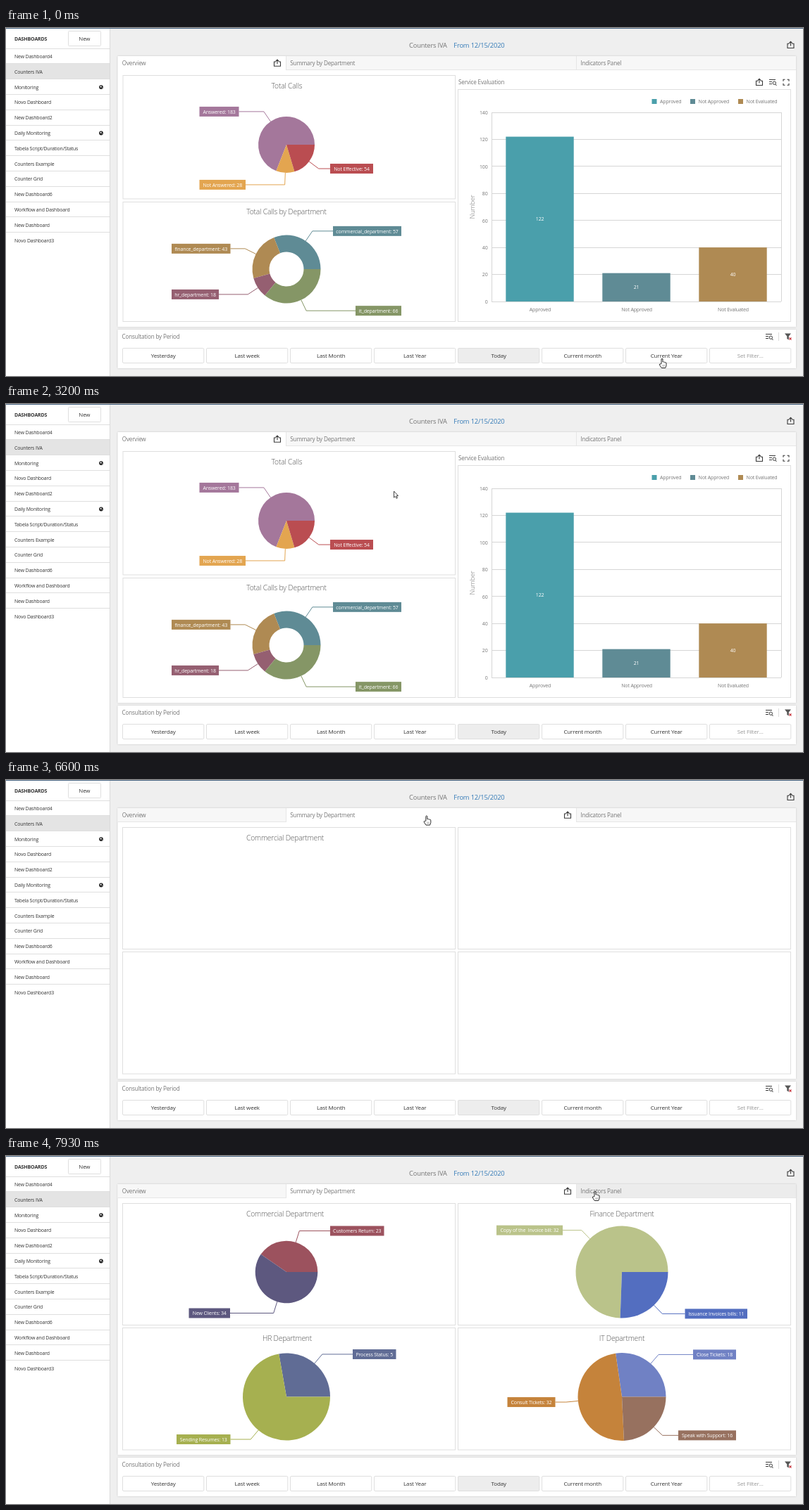
Recreate the animation shown at these times as an HTML page. Size 1131 by 495 pixels, loop 8000 ms.

```html
<!DOCTYPE html>
<html lang="en">
<head>
<meta charset="utf-8">
<title>Dashboard</title>
<style>
html, body { margin: 0; height: 100%; overflow: hidden; background: #efefef; }
svg { display: block; width: 1131px; height: 495px; }
text { font-family: "Open Sans", "Noto Sans", sans-serif; letter-spacing: -.02em; white-space: pre; }
</style>
</head>
<body>
<svg viewBox="0 0 1131 495"><g id="base"></g><g id="live"></g></svg>
<script>
const LOOP = 8000, FPS = 15;
const BORDER = '#dfdfdf', GREY = '#767676', DARK = '#3a3a3a';

const rect = (x, y, w, h, fill, more = '') =>
  `<rect x="${x}" y="${y}" width="${w}" height="${h}" fill="${fill}" ${more}/>`;
const box = (x, y, w, h, fill = '#fff', r = 0) =>
  rect(x, y, w, h, fill, `stroke="${BORDER}" rx="${r}"`);
const line = (d, color, width = 1) =>
  `<path d="${d}" fill="none" stroke="${color}" stroke-width="${width}"/>`;
// y is the middle of the capitals
const text = (s, x, y, size, fill = GREY, anchor = 'start', weight = 400) =>
  `<text x="${x}" y="${y + size * .36}" font-size="${size}" fill="${fill}" text-anchor="${anchor}" font-weight="${weight}">${s}</text>`;
const title = (s, x, y) => text(s, x, y, 10.35, '#555', 'middle', 300);
const at = (x, y, s) => `<g transform="translate(${x} ${y})">${s}</g>`;

const exportIcon = (x, y) => at(x, y,
  line('M-2-1.7H-4.5V4.5H4.5V-1.7H2M0 1.5V-4.6M-2.3-2.4L0-4.7L2.3-2.4', DARK, 1.1));
const searchIcon = (x, y) => at(x, y,
  line('M-5-3.5H4M-5-.5H-1M-5 2.5H-1M3.8 3L5.5 5', DARK) +
  `<circle cx="2.3" cy="1.2" r="2.2" fill="none" stroke="${DARK}"/>`);
const expandIcon = (x, y) => at(x, y,
  line('M-4-1.5V-4H-1.5M1.5-4H4V-1.5M4 1.5V4H1.5M-1.5 4H-4V1.5', DARK, 1.1));
const filterIcon = (x, y) => at(x, y,
  `<path d="M-5-4.5H4L.8-.5V4.5L-1.7 3V-.5Z" fill="#555"/>` + line('M1.5 1.5L4.5 4.7M4.5 1.5L1.5 4.7', '#c9373f', 1.1));
const globe = (x, y) => at(x, y,
  `<circle r="2.9" fill="#222"/><path d="M-1.8-.8L.2-1.9L.8-.4L-.4.6ZM1 .8L2 .3L1.4 1.8Z" fill="#fff"/>`);

function sidebar() {
  const names = ['New Dashboard4', 'Counters IVA', 'Monitoring', 'Novo Dashboard', 'New Dashboard2',
    'Daily Monitoring', 'Tabela Script/Duration/Status', 'Counters Example', 'Counter Grid',
    'New Dashboard6', 'Workflow and Dashboard', 'New Dashboard', 'Novo Dashboard3'];
  let s = rect(0, 0, 147, 495, '#fff') + line('M147.5 0V495', '#dadada') +
    text('DASHBOARDS', 12, 15.2, 7, '#333', 'start', 700) +
    box(88.5, 4.5, 46, 21, '#fff', 1) + text('New', 111.3, 15, 7.9, '#333', 'middle');
  names.forEach((name, i) => {
    const y = 40.5 + 21.8 * i, top = Math.round(y - 11) - .5;
    if (i == 1) s += rect(0, top, 147, 21.8, '#e4e4e4');
    s += line(`M0 ${top}H147`, BORDER) + text(name, 12, y, 6.9, '#333');
    if (i == 2 || i == 5) s += globe(135, y);
  });
  return s;
}

function periodBar() {
  const names = ['Yesterday', 'Last week', 'Last Month', 'Last Year', 'Today', 'Current month', 'Current Year', 'Set Filter...'];
  return rect(158.5, 429, 962.5, 55, '#fff', 'class="card"') +
    text('Consultation by Period', 164.5, 438.6, 8.1) +
    searchIcon(1083, 439) + line('M1096.5 433V445', '#ddd') + filterIcon(1110, 439) +
    names.map((name, i) => {
      const x = 165.5 + 119 * i;
      return box(x, 455.5, 115.3, 21, i == 4 ? '#ededed' : '#fff', 1.5) +
        text(name, x + 57.7, 466, 8, i == 7 ? '#999' : '#333', 'middle');
    }).join('');
}

// Slices run counter-clockwise from the right: [name, value, colour, label left, label width]
function pie(cx, cy, R, slices, hole = 0) {
  const total = slices.reduce((n, s) => n + s[1], 0);
  const pt = (r, a) => [cx + r * Math.cos(a), cy - r * Math.sin(a)];
  let a = 0, out = '';
  for (const [name, value, color, x, w] of slices) {
    const b = a + value / total * 2 * Math.PI, mid = (a + b) / 2, big = b - a > Math.PI ? 1 : 0;
    out += `<path fill="${color}" d="M${pt(hole, a)}L${pt(R, a)}A${R} ${R} 0 ${big} 0 ${pt(R, b)}L${pt(hole, b)}` +
      (hole ? `A${hole} ${hole} 0 ${big} 1 ${pt(hole, a)}` : '') + 'Z"/>';
    const [ex, ey] = pt(R + 17, mid);
    out += line(`M${pt(R, mid)}L${ex} ${ey}H${x > ex ? x : x + w}`, color) +
      rect(x, ey - 7, w, 14, color) + text(`${name}: ${value}`, x + w / 2, ey + .2, 7, '#fff', 'middle');
    a = b;
  }
  return out;
}

function barChart() {
  const bars = [['Approved', 122, '#4a9fab', 916.5], ['Not Approved', 21, '#5f8b95', 971], ['Not Evaluated', 40, '#af8a53', 1039]];
  const yOf = v => 389 - v * 1.9214;
  let s = text('Service Evaluation', 642, 77.3, 8.1) + exportIcon(1069, 77) + searchIcon(1088, 77) + expandIcon(1107, 77.3) +
    box(641.5, 87.5, 472, 330);
  for (let v = 0; v <= 140; v += 20) {
    const y = Math.floor(yOf(v)) + .5;
    s += line(`M689 ${y}H1100`, '#d6d6d6') + text(v, 683.5, yOf(v) + .3, 7, GREY, 'end');
  }
  s += line('M689.5 120V389M1100.5 120V389', '#d6d6d6') +
    `<g transform="translate(662 254.5) rotate(-90)">${text('Number', 0, 0, 9.4, GREY, 'middle', 300)}</g>`;
  bars.forEach(([name, v, color, lx], i) => {
    const x = 757.6 + 137 * i, y = yOf(v);
    s += rect(lx, 101, 7, 7, color) + text(name, lx + 11.5, 104.7, 7) +
      rect(x - 48.3, y, 96.4, 389 - y, color) +
      text(v, x, (y + 389) / 2, 7, '#fff', 'middle') + text(name, x + .4, 400, 7, GREY, 'middle');
  });
  return s;
}

const overview = box(166, 67.5, 471.5, 175.5) + title('Total Calls', 398.5, 82) +
  pie(398, 166, 40, [['Answered', 183, '#a4779b', 274.5, 56], ['Not Answered', 28, '#e3a550', 274.5, 65.5],
    ['Not Effective', 54, '#ba4d51', 460, 61]]) +
  box(166, 247.5, 471.5, 170) + title('Total Calls by Department', 398, 261.7) +
  pie(398, 343, 48.5, [['commercial_department', 57, '#5f8b95', 464, 97], ['finance_department', 43, '#af8a53', 235, 83.5],
    ['hr_department', 18, '#955f71', 235, 67], ['it_department', 66, '#859666', 496, 65]], 24.5) +
  barChart();

// [first frame, content]
const summary = [
  [92, [166, 642].map(x => box(x - .5, 67.5, 472, 173) + box(x - .5, 244.5, 472, 173.5)).join('')],
  [99, title('Commercial Department', 396, 82)],
  [101, pie(398, 165, 44.3, [['Customers Return', 23, '#9c525e', 460, 76.5], ['New Clients', 34, '#5d587f', 259.5, 58.5]])],
  [102, title('HR Department', 399, 259.5)],
  [103, pie(398, 342.5, 62, [['Process Status', 5, '#606c95', 492, 61.5], ['Sending Resumes', 13, '#a6b050', 242, 76.5]]) +
    title('Finance Department', 874, 82)],
  [104, pie(874, 165, 65.5, [['Copy of the  Invoice bill', 32, '#bac38a', 696, 94], ['Issuance Invoices bills', 11, '#536ec0', 963.5, 88.5]]) +
    title('IT Department', 874, 259.5) +
    pie(874, 342.5, 62.5, [['Close Tickets', 18, '#7081c4', 975, 61], ['Consult Tickets', 32, '#c5833b', 711.5, 68],
      ['Speak with Support', 16, '#97715f', 954, 82]])]
];

function tabs(active, hover) {
  const list = [['Overview', 158.5, 397], ['Summary by Department', 397, 809], ['Indicators Panel', 809, 1121]];
  return list.map(([name, x, end], i) =>
    (i == active ? exportIcon(end - 12, 49.7)
      : rect(x, 40, end - x, 20, i == hover ? '#ececec' : '#f7f7f7') + line(`M${x} 59.5H${end}`, '#e6e6e6')) +
    (i ? line(`M${x + .5} 40V60`, '#e6e6e6') : '') + text(name, x + 6.3, 50, 8.1)).join('');
}

// Pointer tip: [frame, x, y]
const path = [[0, 931, 470], [1, 850, 461], [3, 779, 453], [5, 779, 453], [6, 778.5, 452.5], [14, 778.5, 452.5],
  [15, 775, 436], [17, 767, 403.5], [18, 767, 403.5], [19, 768, 404], [25, 768, 404], [28, 792, 335], [31, 770, 255],
  [33, 725, 225], [35, 675, 248], [37, 632, 298], [42, 592, 210], [46, 555, 143], [48, 550, 123.5], [50, 550.5, 107],
  [54, 552, 80], [57, 551, 62], [60, 551, 51], [69, 551, 51], [71, 552, 53], [91, 552, 53], [97, 578, 51],
  [102, 625, 50], [104, 650, 50], [110, 748, 50], [114, 806, 50], [117, 831, 50], [119, 836, 50]];

function tip(n) {
  const i = path.findIndex(p => p[0] >= n);
  if (i < 1) return path[0].slice(1);
  const [a, x, y] = path[i - 1], [b, u, v] = path[i], k = (n - a) / (b - a);
  return [x + (u - x) * k, y + (v - y) * k];
}

const arrow = `<path d="M.5 .5V9.6L2.6 7.7L4 10.8L5.5 10.1L4.1 7.1H6.6Z" fill="#fff" stroke="#333" stroke-width=".9"/>`;
const hand = `<path d="M-1 7.6V1Q0-.7 1 1V5Q2.3 4.2 2.8 5.4Q4.1 4.6 4.5 5.9Q6 5.4 6 7V10L4.8 13.5H-.8L-3.6 9.2Q-3.9 7.4-2.3 8Z" fill="#fff" stroke="#222" stroke-width=".95" stroke-linejoin="round"/>` +
  line('M1.2 9V12M3.2 9V12', '#666', .6);

const base = document.getElementById('base'), live = document.getElementById('live');
base.innerHTML = '<style>.card{filter:drop-shadow(0 .5px 1px rgba(0,0,0,.18))}</style>' +
  sidebar() + text('Counters IVA', 572, 24.5, 9.35) + text('From 12/15/2020', 635.3, 24.5, 9.4, '#337ab7') +
  exportIcon(1113.5, 24) + rect(158.5, 40, 962.5, 385, '#fff', 'class="card"') + periodBar() + rect(0, 0, 1131, 1, '#4a6785');

let shown = -1;
function draw(now) {
  const n = Math.floor(now % LOOP * FPS / 1000 + .06) % (LOOP * FPS / 1000);
  if (n != shown) {
    shown = n;
    const [x, y] = tip(n), active = n < 86 ? 0 : 1;
    const onTab = y < 60, onButton = y > 456;
    const hover = !onTab ? -1 : x < 809 ? 1 : 2;
    const content = active ? summary.filter(s => n >= s[0]).map(s => s[1]).join('') : overview;
    live.innerHTML = tabs(active, hover) + content + at(x, y, onTab || onButton ? hand : arrow);
  }
  requestAnimationFrame(draw);
}
const start = performance.now();
requestAnimationFrame(function first(now) { draw(Math.max(0, now - start)); });
</script>
</body>
</html>
```
